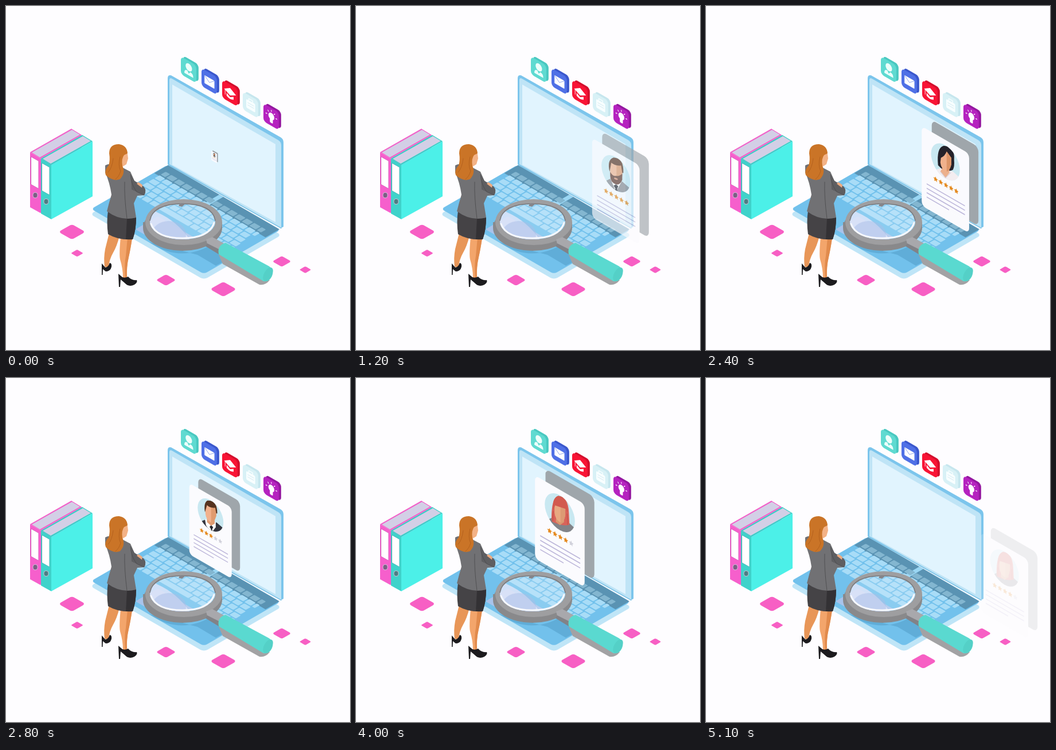
An HTML page with a canvas that plays this animation: 600 px wide and 600 px high, repeating every 5200 ms.

```html
<!DOCTYPE html>
<html>
<head>
<meta charset="utf-8">
<style>
  html, body { margin: 0; width: 100%; height: 100%; overflow: hidden; background: #fefdff; }
  canvas { display: block; }
</style>
</head>
<body>
<canvas id="stage" width="600" height="600"></canvas>
<script>
const LOOP = 5200, STEP = 1267, COS = 0.866;
const stage = document.getElementById('stage').getContext('2d');

function layer() {
  const c = document.createElement('canvas');
  c.width = c.height = 600;
  return c.getContext('2d');
}

let g;

function shape(color, d) {
  g.fillStyle = color;
  g.fill(new Path2D(d));
}

function line(color, width, d) {
  g.strokeStyle = color;
  g.lineWidth = width;
  g.lineCap = g.lineJoin = 'round';
  g.stroke(new Path2D(d));
}

function oval(color, x, y, rx, ry = rx, turn = 0) {
  g.fillStyle = color;
  g.beginPath();
  g.ellipse(x, y, rx, ry, turn, 0, Math.PI * 2);
  g.fill();
}

function box(color, x, y, w, h, r = 0) {
  g.fillStyle = color;
  g.beginPath();
  g.roundRect(x, y, w, h, r);
  g.fill();
}

// Isometric planes: a wall facing the viewer's left and the floor.
function wall(x, y, draw) {
  g.save();
  g.transform(COS, 0.5, 0, 1, x, y);
  draw();
  g.restore();
}

function floor(x, y, draw) {
  g.save();
  g.transform(COS, 0.5, -COS, 0.5, x, y);
  draw();
  g.restore();
}

function binder(x, y, edge, spine, side, hole) {
  g.save();
  g.translate(x, y);
  shape(edge, 'M0 0L72 -41L90 -30L18 11Z');
  shape('#d3cfe6', 'M3 0.5L73 -39L87 -30.5L17 9Z');
  shape(spine, 'M0 0L18 11V106L0 96Z');
  shape(side, 'M18 11L90 -30V66L18 106Z');
  line('rgba(90,60,110,.45)', 0.8, 'M2 8.5L14.5 15.5V63L2 56Z');
  shape('#fff', 'M2 8.5L14.5 15.5V63L2 56Z');
  oval('#cfc3da', 9, 75, 4.6, 5.3);
  oval(hole, 9, 75, 3.6, 4.3);
  g.restore();
}

function diamond(x, y, size) {
  floor(x, y, () => box('#f75fc4', -size / 2, -size / 2, size, size, size * 0.18));
}

function keyboard() {
  floor(282, 277, () => {
    box('#72c1ec', 0, 0, 227, 154, 6);
    box('#5a93b3', 1, 0, 224, 28);
    box('#9ad6f3', 104, 0, 8, 28);
    for (let row = 0; row < 6; row++) {
      const y = 14 + row * 12.4;
      let x = 10;
      for (let i = 0; x < 208; i++) {
        const wide = row === 5 && i === 3;
        const w = Math.min(wide ? 64 : i ? 13 : 9 + row * 2.4, 212 - x);
        box(row === 0 ? '#83b6d0' : '#a8dcf7', x, y, w, 10.2, 1.5);
        x += w + 2.2;
      }
    }
    box('#a9c3ea', 80, 100, 72, 45, 3);
  });
}

function laptop() {
  floor(282, 285, () => box('#bfe5f7', 0, 0, 229, 156, 7));
  keyboard();
  shape('#7cc5ec', 'M282 126Q282 120 288 121L479 229Q484 232 484 238V385L480 387L282 276Z');
  shape('#bfe4f6', 'M285 130Q285 124 290 127L475 234Q480 237 480 243V387L285 276Z');
  shape('#e1f4fe', 'M290 137L470 241V377L290 277Z');
  line('#80c5e8', 1.5, 'M283 277L480 387.5');
}

function lens() {
  shape('rgba(55,125,170,.3)', 'M250 412Q305 450 362 414L389 441L366 453L334 434Z');
  oval('#89898b', 308, 387, 69, 40);
  g.fillStyle = '#89898b';
  g.fillRect(239, 377, 138, 10);
  oval('#9e9ea0', 310, 377, 67, 40);
  g.save();
  g.beginPath();
  g.ellipse(308, 376, 57, 31, 0, 0, Math.PI * 2);
  g.clip();
  keyboard();
  g.fillStyle = 'rgba(235,245,255,.2)';
  g.fillRect(240, 340, 140, 75);
  shape('rgba(222,229,250,.85)', 'M248 350L264 360Q300 376 322 410H248Z');
  oval('rgba(170,190,232,.5)', 284, 399, 30, 24);
  g.restore();
  line('#f6f8fd', 3, 'M253 380Q262 405 308 405Q354 405 363 378');
  line('#7a7a7d', 1.5, 'M251 374Q256 345 308 345Q360 345 365 374');
  shape('#85858a', 'M303 345L313 345L307 350L301 349Z');
}

function handle() {
  shape('#a2a2a4', 'M371 434L379 430L460 478Q452 488 442 486L378 450Z');
  shape('#a8a8ac', 'M349 407L360 403L380 414L371 425L351 415Z');
  shape('#828287', 'M351 414L373 425L371 433L348 419Z');
  shape('#5ad9d0', 'M371 433Q368 417 383 413L459 454Q468 460 464 471Q459 482 449 480Z');
  oval('#54d0c7', 457, 468, 7, 13, 0.5);
}

function tile(i, front, back, glyph) {
  const x = 305 + i * 36, y = 88 + i * 20.5;
  wall(x + 4, y - 1.5, () => box(back, 0, 0, 31, 31, 6));
  wall(x, y, () => {
    box(front, 0, 0, 31, 31, 6);
    glyph();
  });
}

function tiles() {
  tile(0, '#5fdad1', '#49c8c0', () => {
    oval('#ecfffb', 16, 11, 6.5, 6.5);
    shape('#ecfffb', 'M7 25Q7 18 13 18L16 22L19 18Q25 18 25 25Z');
  });
  tile(1, '#4f70e6', '#3a57cc', () => {
    box('#fff', 6, 9, 20, 14, 1);
    line('#7f97ee', 0.8, 'M7 10L16 17L25 10');
  });
  tile(2, '#f81435', '#d40f2e', () => {
    shape('#fff', 'M4 13L16 6L28 13L16 19Z');
    shape('#fff', 'M9 18L16 22L23 18V23Q16 27 9 23Z');
    line('#fff', 1, 'M6 14V22');
  });
  tile(3, '#d8f1f6', '#c6e6ee', () => {
    box('#f8feff', 7, 9, 18, 15, 2);
    line('#f8feff', 1.5, 'M12 9V6H20V9');
    line('#d4eaf0', 1, 'M10 14H22M10 18H22');
  });
  tile(4, '#b522bf', '#9418a0', () => {
    oval('#fff', 16, 14.5, 6);
    box('#fff', 13, 18, 6, 8, 1.5);
    line('#fff', 1.3, 'M16 4V6M7 14H5M27 14H25M9 7L10.5 8.5M23 7L21.5 8.5');
  });
}

function woman() {
  shape('#e89658', 'M180 396L198 401Q193 420 187 430Q180 442 179 456L172 455Q170 440 173 424Q177 408 180 396Z');
  shape('#f3a56b', 'M200 403L220 405Q217 425 214 438Q210 455 211 474H204Q204 458 199 442Q197 432 200 403Z');
  shape('#e18b4d', 'M212 404L220 405Q217 425 214 438Q210 455 211 474H208Q206 450 209 436Z');
  shape('#1c1b1e', 'M167 449L173 456Q178 456 181 448Q185 449 184 455Q182 463 174 463L169 459L168.5 469H167Z');
  shape('#1c1b1e', 'M196 467L203 473Q208 475 213 472Q219 479 228 478Q230 482 224 486Q214 491 207 483L200 477L199 490H197Z');
  shape('#454346', 'M178 357Q202 371 227 369Q227 390 221 407Q197 409 178 398Q175 377 178 357Z');
  shape('#333134', 'M211 371L227 369Q227 390 221 407L209 407Z');
  shape('#717174', 'M173 278Q181 273 198 279L217 289L224 305L240 315Q246 322 241 330L229 331L223 344L227 369Q200 376 176 358Q180 342 184 329Q181 308 173 290Z');
  shape('#5e5e61', 'M218 294L224 305L240 315Q246 322 241 330L219 320Z');
  line('#4d4d50', 0.9, 'M217 294Q218 311 228 324L241 330M207 307Q206 331 211 371');
  shape('#efac82', 'M231 307L238 312L237 317L228 310Z');
  shape('#f3b286', 'M200 255Q207 249 212 258L213 266L210 276L202 281L196 270Z');
  shape('#ca7427', 'M180 257Q180 241 197 241Q211 243 212 257L206 260Q201 266 203 279Q209 291 199 302Q188 307 174 295Q171 286 179 278Q182 269 180 257Z');
  line('#b4611d', 1, 'M199 263Q195 278 200 288Q197 298 191 302M187 266Q185 283 178 290');
}

function scene() {
  g.fillStyle = '#fefdff';
  g.fillRect(0, 0, 600, 600);
  binder(42, 255, '#f260c9', '#f65fcc', '#f260c9', '#7d5d86');
  binder(61, 266, '#37cfc6', '#3fd2ca', '#4cf0e8', '#4c7f85');
  for (const d of [[115, 394, 27], [124, 431, 12.5], [279, 478, 20],
                   [379, 494, 26.5], [481, 445.5, 19], [522, 460, 12]]) diamond(...d);
  laptop();
  lens();
  handle();
  tiles();
  woman();
}

const portraits = [
  () => {
    shape('#85868b', 'M-24 16L-10 9L11 14L27 28V40H-24Z');
    shape('#fff', 'M-10 8L0 32L10 14Z');
    shape('#25262e', 'M-4 21L0 19L4 22L2 27L4 38H-3L-1 26Z');
    shape('#f1b18c', 'M-10 -21Q0 -28 11 -18V4Q8 18 0 18Q-10 12 -10 0Z');
    shape('#dd9568', 'M1 -23L11 -18V4Q8 18 1 18Z');
    shape('#5e3528', 'M-10 -3Q-6 5 0 4Q7 5 11 0L11 11Q7 21 0 19Q-10 15 -10 4Z');
    oval('#d58d70', 0, 9, 3.5, 1.5, 0.4);
    shape('#56301f', 'M-11 -3Q-16 -24 -4 -28Q14 -27 13 -1H11L9 -14Q-2 -13 -8 -19Z');
  },
  () => {
    shape('#f4edf0', 'M-24 16L-8 11L13 17L26 29V40H-24Z');
    shape('#25222a', 'M-13 6Q-16 -25 -3 -28Q17 -26 15 -3Q16 8 13 14Q3 19 -8 11Z');
    shape('#edb08c', 'M-5 10H6L7 19L0 28L-9 17Z');
    shape('#f1b18c', 'M-8 -7Q-1 -10 2 -18L10 -7V5Q7 17 0 17Q-8 11 -9 1Z');
    shape('#dd9568', 'M2 -18L10 -7V5Q7 17 2 17Z');
    line('#d5cad3', 1, 'M-9 17L0 28L9 19');
  },
  () => {
    shape('#34353e', 'M-25 15L-10 9L12 15L27 28V40H-25Z');
    shape('#fff', 'M-11 8L-9 20L1 36L10 24L10 14Z');
    shape('#25262e', 'M-2 23L1 20L5 24L3 28L5 39H-1L1 28Z');
    shape('#df9c72', 'M-7 6H8V17L1 21L-7 14Z');
    shape('#f1b18c', 'M-10 -20Q0 -28 11 -17V2Q7 15 1 15Q-9 9 -10 -2Z');
    shape('#e09b6f', 'M1 -23L11 -17V2Q7 15 1 15Z');
    shape('#55331f', 'M-11 -5Q-14 -24 -6 -28Q13 -29 13 -3H11L9 -14Q-1 -13 -7 -19Z');
  },
  () => {
    shape('#828388', 'M-25 14L-10 7L13 15L27 28V40H-25Z');
    shape('#d9635a', 'M-14 9Q-14 -24 -3 -28Q14 -27 15 0L16 20Q5 24 -13 15Z');
    shape('#d9966e', 'M-6 7H7V16L0 21L-7 15Z');
    shape('#e8a981', 'M-9 -14L9 -7V4Q7 17 0 16Q-8 11 -9 0Z');
    shape('#dd9a74', 'M1 -11L9 -7V4Q7 17 1 16Z');
    shape('#d25a4f', 'M-11 -3Q-14 -25 -2 -28Q13 -25 13 0L10 -6L-8 -12Z');
    line('#c04e45', 1, 'M-11 -2L-12 14M12 2L13 20');
  }
];
const ratings = [5, 5, 3, 4];

function star(color, x, y) {
  g.fillStyle = color;
  g.beginPath();
  for (let i = 0; i < 10; i++) {
    const a = (i - 2.5) * Math.PI / 5, r = i % 2 ? 2.4 : 4.8;
    g.lineTo(x + r * Math.cos(a), y + r * Math.sin(a));
  }
  g.fill();
}

function card(index) {
  wall(332, 163, () => box('#9fa6ab', 0, 0, 94, 138, 9));
  wall(314.5, 174, () => {
    box('#fbfbfe', 0, 0, 95.5, 138.5, 8);
    oval('#c9e8f1', 47.8, 38.3, 29);
    for (let i = 0; i < 5; i++) star(i < ratings[index] ? '#e58a20' : '#d2d2dc', 28 + i * 10.4, 78.5);
    for (let i = 0; i < 4; i++) box('#bdb7da', 10, 94.5 + i * 7.7, i < 3 ? 77 : 45, 1.8);
  });
  g.save();
  wall(314.5, 174, () => {
    g.beginPath();
    g.arc(47.8, 38.3, 29, 0, Math.PI * 2);
  });
  g.clip();
  g.translate(356, 236);
  portraits[index]();
  g.restore();
}

const backdrop = layer(), sheet = layer();
g = backdrop;
scene();

const clamp = v => Math.max(0, Math.min(1, v));
// Damped spring pop, then an accelerating slide off to the right.
const popScale = t => 1 + 1.04 * Math.exp(-0.00855 * t) * Math.sin(Math.PI * (t - 85) / 125);
const slide = t => 164 * (Math.max(0, t - 872) / 427) ** 2;
const fade = t => clamp((1333 - t) / 200);

function render(time) {
  stage.drawImage(backdrop.canvas, 0, 0);
  g = sheet;
  for (let i = 0; i < 4; i++) {
    const t = time - i * STEP;
    if (t < 0 || t >= 1333) continue;
    const scale = popScale(t), dx = slide(t);
    g.clearRect(0, 0, 600, 600);
    g.save();
    g.translate(364 + dx, 263 + dx * 0.578);
    g.scale(scale, scale);
    g.translate(-364, -263);
    card(i);
    g.restore();
    stage.globalAlpha = fade(t);
    stage.drawImage(g.canvas, 0, 0);
    stage.globalAlpha = 1;
  }
}

const start = performance.now();
function tick() {
  render((performance.now() - start) % LOOP);
  requestAnimationFrame(tick);
}
tick();
</script>
</body>
</html>
```
